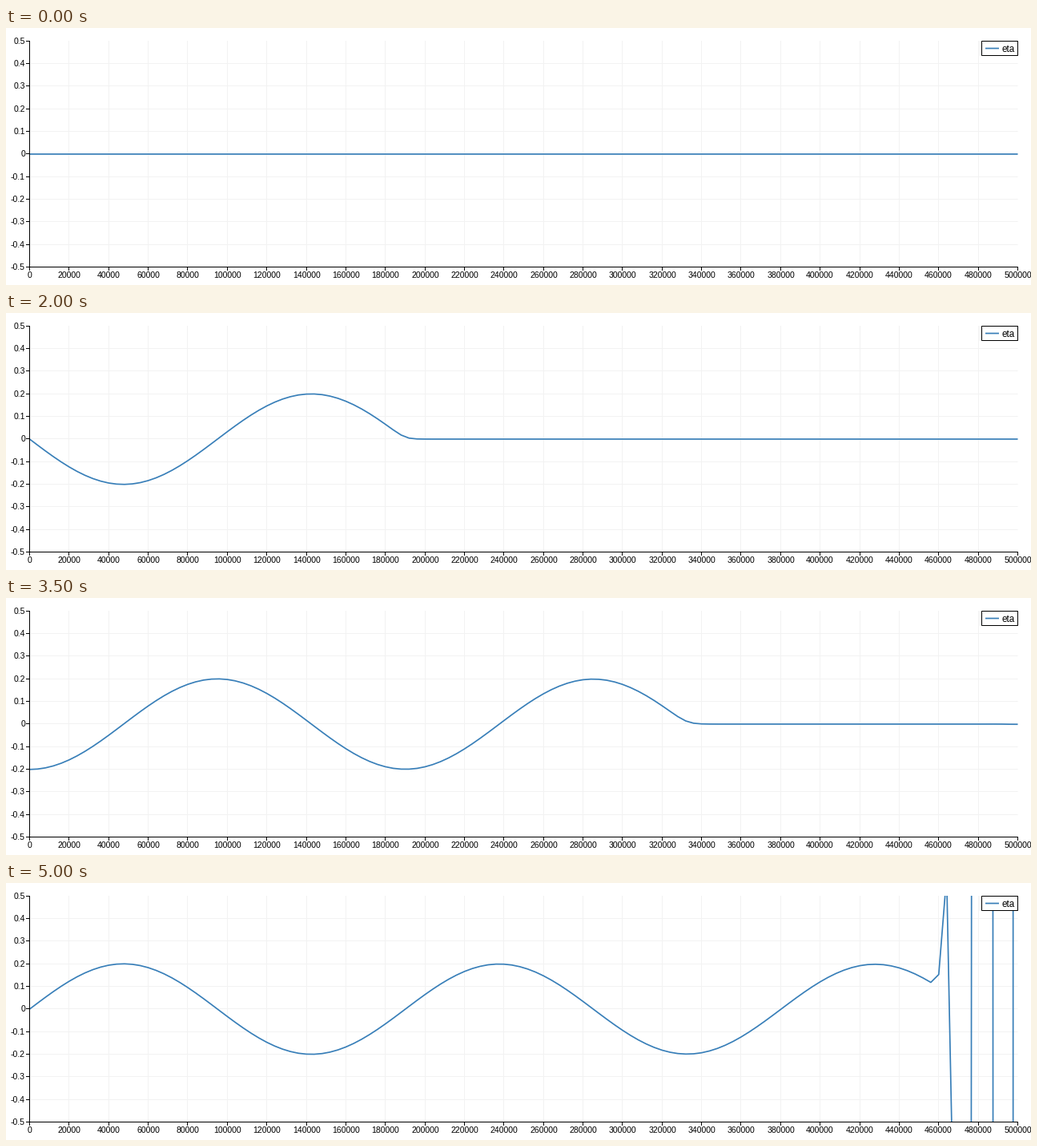
Write a matplotlib script that moves like this. It is 1280 px wide and 322 px high and loops after 5500 ms.

```python
import math

import numpy as np
import matplotlib.pyplot as plt
from matplotlib.animation import FuncAnimation
from matplotlib.patches import Rectangle

W, H, DPI = 1280, 322, 100
PX = 72 / DPI                       # one pixel in points
LEFT, RIGHT, TOP, BOTTOM = 29.5, 1263.5, 16, 300
SPAN = 500                          # thousands along the x axis
BLUE, GRID = "#377eb8", "#f2f2f2"
STEPS, INTERVAL = 11, 500
FRONT = 47.53                       # distance the wave front runs per step

plt.rcParams["font.family"] = "Liberation Sans"
fig = plt.figure(figsize=(W / DPI, H / DPI), dpi=DPI, facecolor="white")
ax = fig.add_axes([0, 0, 1, 1])
ax.set_xlim(0, W)
ax.set_ylim(H, 0)
ax.axis("off")


def px(x):
    return LEFT + x * (RIGHT - LEFT) / SPAN


def py(v):
    return 158 - 284 * v


def center(p):
    return math.floor(p) + 0.5


def stroke(x0, y0, x1, y1, color="black", z=3, width=1):
    ax.plot([x0, x1], [y0, y1], color=color, lw=width * PX, zorder=z,
            solid_capstyle="butt", snap=False)


def label(x, y, text, ha, size=10.5):
    ax.text(x, y, text, ha=ha, va="center_baseline", fontsize=size * PX,
            color="black", zorder=6)


def draw_axes():
    for k in range(26):
        x = center(px(20 * k))
        if 0 < k < 25:
            stroke(x, TOP, x, BOTTOM, GRID, 1)
        stroke(x, BOTTOM, x, BOTTOM + 4)
        label(x, 308.7, str(20000 * k), "center")
    for k in range(11):
        y = center(TOP + 28.35 * k)
        if 0 < k < 10:
            stroke(LEFT, y, RIGHT, y, GRID, 1)
        stroke(25, y, LEFT, y)
        label(24, y - 0.3, f"{(5 - k) / 10:g}", "right")
    stroke(LEFT, TOP, LEFT, BOTTOM, z=4)
    stroke(LEFT - 0.5, BOTTOM - 0.5, RIGHT + 0.5, BOTTOM - 0.5, z=4)


def draw_legend():
    ax.add_patch(Rectangle((1218.5, 16.5), 45, 18, fc="white", ec="black",
                           lw=PX, zorder=5, snap=False))
    stroke(1223, 25.5, 1240, 25.5, BLUE, 6, 1.7)
    label(1243, 25, "eta", "left", 11.6)


draw_axes()
draw_legend()

grid_x = np.linspace(0, SPAN, 126)
curve, = ax.plot([], [], color=BLUE, lw=1.7 * PX, zorder=2.5, snap=False,
                 solid_joinstyle="round", solid_capstyle="butt")
curve.set_clip_path(Rectangle((LEFT, TOP), RIGHT - LEFT + 0.5, BOTTOM - TOP,
                              transform=ax.transData))


def wave(step):
    # the front is a soft corner that widens as it travels
    soft = 1.15 * max(step, 0.01) ** 0.4
    behind = soft * np.logaddexp(0, (FRONT * step - grid_x) / soft)
    amp = 0.2 * np.exp(-grid_x / 40000)
    return amp * np.sin(np.pi / 2 * behind / FRONT)


def blowup(step):
    # oscillation growing out of the right boundary and creeping left
    s = grid_x - (497.2 - 15.5 * (step - 8))
    foot = -4.5 - 13 * (10 - step)
    size = 0.115 * 3.7 ** (step - 8) * np.exp(0.23 * s)
    return -size * np.sin(2 * np.pi * s / 21.6) / (1 + np.exp(foot - s))


def draw(step):
    eta = wave(step) + blowup(step) if step else np.zeros_like(grid_x)
    curve.set_data(px(grid_x), py(eta))
    return curve,


anim = FuncAnimation(fig, draw, frames=STEPS, interval=INTERVAL,
                     init_func=lambda: draw(0), repeat=True, repeat_delay=0)
plt.show()
```
